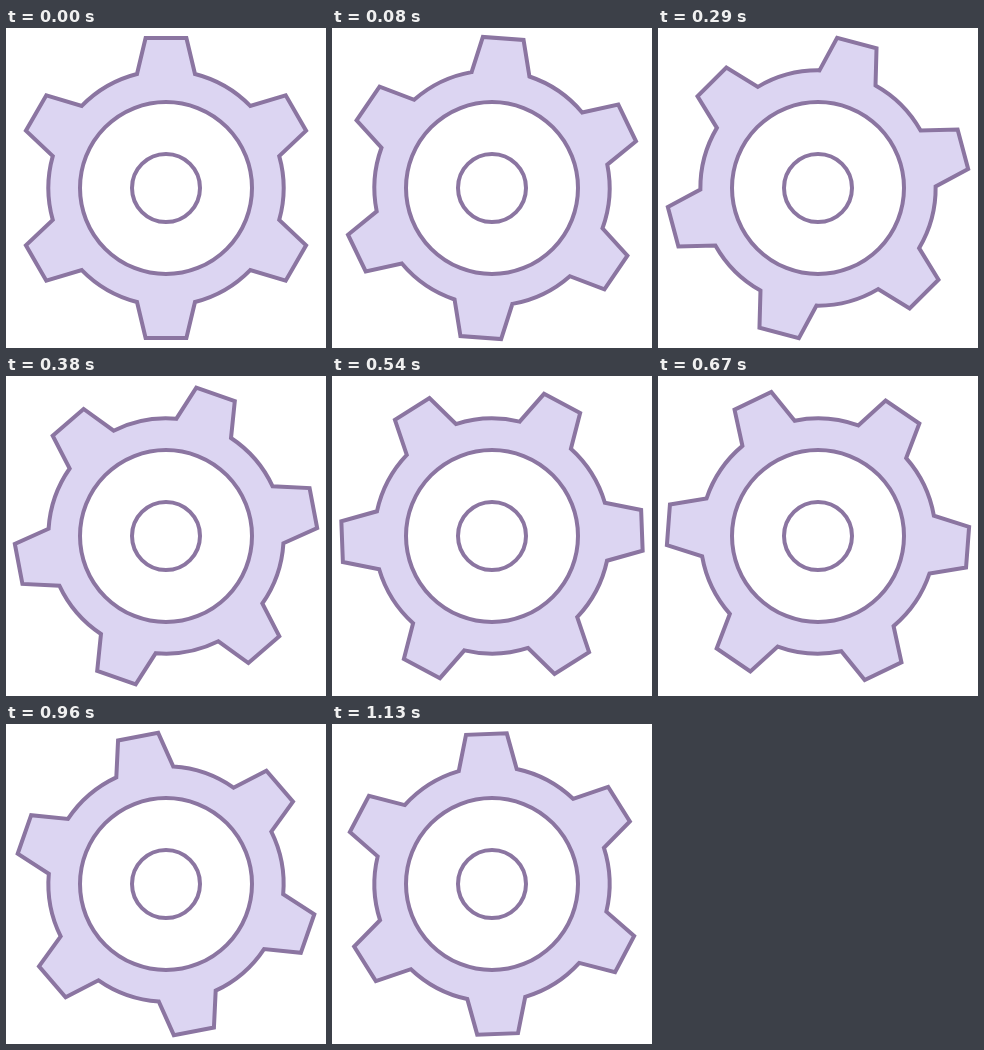
An HTML page that plays this animation: 320 px wide and 320 px high, repeating every 1.18 s.

```html
<!DOCTYPE html>
<html lang="en">
<head>
<meta charset="utf-8">
<title>Turning gear</title>
<style>
  html, body { margin: 0; width: 100%; height: 100%; overflow: hidden; background: #fff; }
  svg { display: block; width: 100%; height: 100%; }
</style>
</head>
<body>
<svg viewBox="-160 -160 320 320" fill="#fff" stroke="#8b75a1" stroke-width="4" stroke-miterlimit="10">
  <path id="gear" fill="#dcd5f2"/>
  <circle r="86"/>
  <circle r="34"/>
</svg>
<script>
const LOOP = 1180, STEPS = 28, TEETH = 6, BODY = 117.6;
const gear = document.getElementById('gear');

// One tooth pointing up: base, tip, tip, base
const tooth = [[-29, -114], [-20.4, -150], [20.4, -150], [29, -114]];

function turn([x, y], angle) {
  const c = Math.cos(angle), s = Math.sin(angle);
  return [x * c - y * s, x * s + y * c].map(v => v.toFixed(2)).join(' ');
}

let d = '';
for (let i = 0; i < TEETH; i++) {
  const points = tooth.map(p => turn(p, i * 2 * Math.PI / TEETH));
  d += (i ? `A${BODY} ${BODY} 0 0 1 ` : 'M') + points.join('L');
}
d += `A${BODY} ${BODY} 0 0 1 ${turn(tooth[0], 0)}Z`;
gear.setAttribute('d', d);

// 24 steps per second, each starting on a rounded hundredth of a second
function draw(now) {
  const tick = Math.floor(now % LOOP / 10);
  const step = Math.min(STEPS - 1, Math.ceil((2 * tick + 1) * 12 / 100) - 1);
  gear.setAttribute('transform', `rotate(${step * 360 / TEETH / STEPS})`);
}

let start;
function frame(now) {
  start ??= now;
  draw(now - start);
  requestAnimationFrame(frame);
}
draw(0);
requestAnimationFrame(frame);
</script>
</body>
</html>
```
